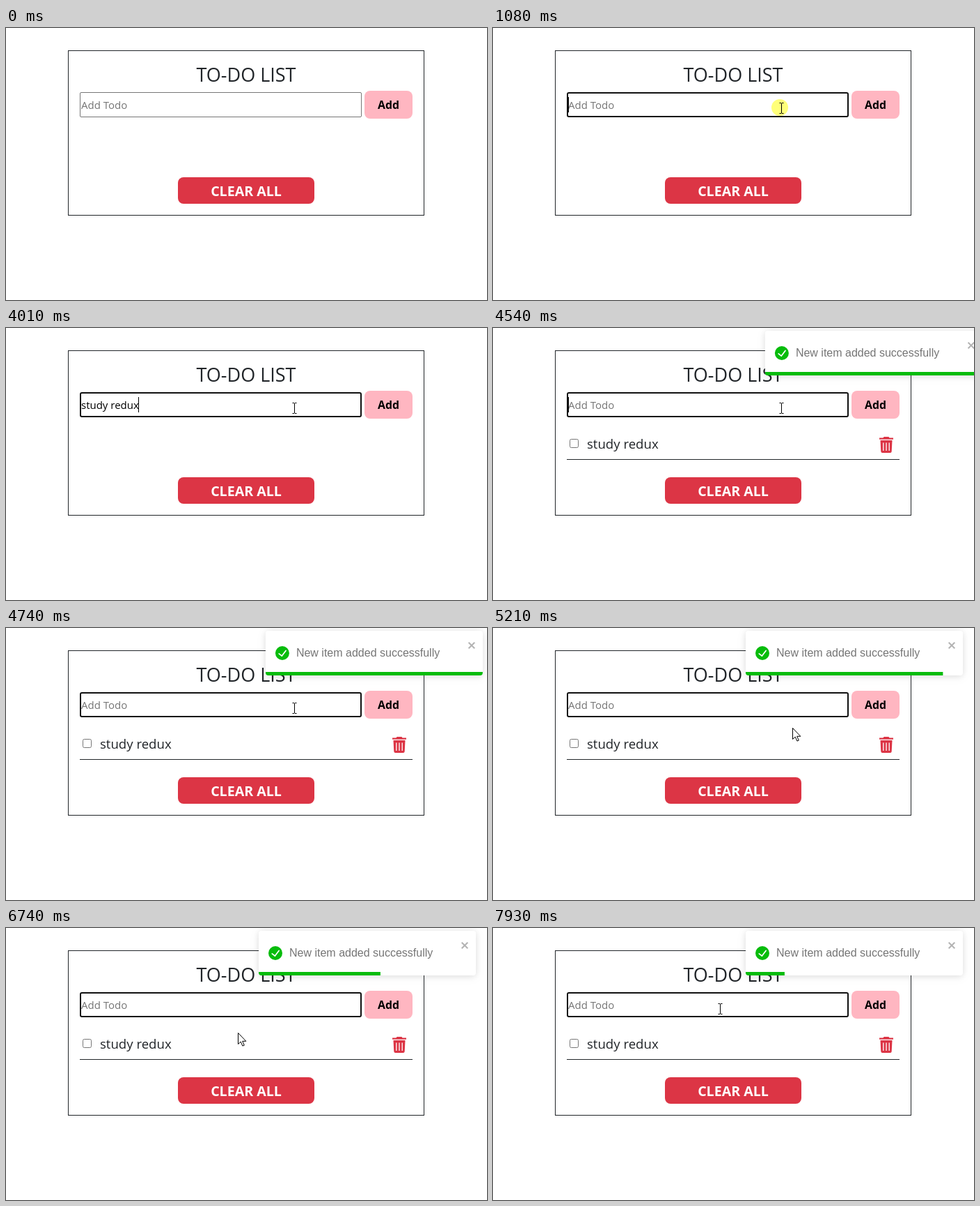
Recreate the animation shown at these times as an HTML page. Size 691 by 390 pixels, loop 8 s.

```html
<!DOCTYPE html>
<html lang="en">
<head>
<meta charset="utf-8">
<title>To-do list</title>
<style>
  html, body { margin: 0; width: 100%; height: 100%; overflow: hidden; background: #fff; }
  svg { display: block; }
  text { font-family: "Open Sans", "Noto Sans", sans-serif; fill: #212529; white-space: pre; }
  .mid { text-anchor: middle; }
  .bold { font-weight: 700; }
  .field { font-size: 15px; }
  .toast { filter: drop-shadow(0 1px 5px rgba(0, 0, 0, .1)) drop-shadow(0 2px 7px rgba(0, 0, 0, .05)); }
  .toast text { font: 16px "Liberation Sans", Arial, sans-serif; fill: #757575; }
  .line { fill: none; }
  #cursor path { stroke: #000; stroke-linejoin: round; fill: #fff; }
</style>
</head>
<body>
<svg width="691" height="390" viewBox="0 0 691 390">
  <rect x="89.500" y="32.500" width="511" height="236" fill="#fff" stroke="#212529"/>
  <text class="mid" x="345" y="77" font-size="27" font-weight="500">TO-DO LIST</text>

  <rect id="blur" x="106.500" y="92.500" width="404" height="35" rx="1.500" fill="#fff" stroke="#767676"/>
  <rect id="focus" x="107" y="93" width="403" height="34" rx="2" fill="#fff" stroke="#101010" stroke-width="2"/>
  <text id="hint" class="field" x="108" y="116" style="fill:#757575">Add Todo</text>
  <text id="typed" class="field" x="108" y="116" style="fill:#000"></text>
  <rect id="caret" y="99" width="1" height="22"/>

  <rect x="515" y="90" width="69" height="40" rx="8" fill="#ffb6c1"/>
  <text class="mid bold" x="549.500" y="116" font-size="15.800" style="fill:#000">Add</text>

  <g id="item">
    <rect x="110.500" y="159.500" width="12" height="12" rx="2" fill="#fff" stroke="#767676"/>
    <text x="135" y="173" font-size="18.600">study redux</text>
    <g fill="#dc3545">
      <path d="M555 157.500h5.500l1-1.500h7l1 1.500h5.500v2.300h-20z"/>
      <path d="M556.500 161h17l-.8 16q-.1 2-2.200 2h-11q-2.100 0-2.200-2z"/>
    </g>
    <path class="line" d="M560.800 164.500v11.500M565 164.500v11.500M569.200 164.500v11.500" stroke="#fff" stroke-width="1.300"/>
    <path d="M106 188.500h478" stroke="#212529"/>
  </g>

  <rect x="247" y="214" width="196" height="38" rx="8" fill="#dc3545"/>
  <text class="mid bold" x="345" y="241" font-size="19.600" style="fill:#fff">CLEAR ALL</text>

  <clipPath id="round"><rect width="312" height="64" rx="4"/></clipPath>
  <g id="toast">
    <g class="toast"><rect width="312" height="64" rx="4" fill="#fff"/></g>
    <g class="toast" style="filter:none">
      <circle cx="24" cy="32" r="10" fill="#07bc0c"/>
      <path class="line" d="M19.300 32.800l4.100 3.300 5.700-7.700" stroke="#fff" stroke-width="1.700" stroke-linecap="round" stroke-linejoin="round"/>
      <text x="44" y="37">New item added successfully</text>
      <path class="line" d="M291.700 16.700l8.600 8.600m0-8.600l-8.600 8.600" stroke="#b3b3b3" stroke-width="2"/>
      <g clip-path="url(#round)"><rect id="bar" y="59" height="5" fill="#07bc0c"/></g>
    </g>
  </g>

  <circle id="click" cx="412" cy="114" r="12" fill="#ffff7a"/>
  <g id="cursor">
    <path id="beam" style="fill:none" d="M-3-7.500h2.300l.7.700.7-.7H3M0-7V7M-3 7.500h2.300l.7-.7.7.7H3"/>
    <path id="arrow" d="M0 0v16l3.700-3.400 2.700 6 2.400-1-2.600-5.800h5.100z"/>
    <path id="hand" d="M-2 13V2a1.900 1.900 0 0 1 3.800 0v6.500c1-.9 3-.6 3.200.9 1-.7 2.800-.2 3 1.100 1-.4 2.500.1 2.500 1.600v4c0 2-1.500 3-1.500 5v2H0v-2c-1-2.500-3.500-5-5.500-8-1-1.800 1.500-3.200 3.500 0zM1.800 8.500v4M5 9.500v3.500M8 10.500v3.500"/>
  </g>
</svg>
<script>
const LOOP = 8000, FOCUS = 880, SUBMIT = 4290, TOAST = 4230;
const WORD = "study redux";
const keyTimes = [1610, 2000, 2150, 2420, 2620, 2750, 3140, 3340, 3540, 3680, 4010];
// Pointer path: time, x, y
const path = [
  [200, 612, 366], [440, 525, 250], [640, 445, 150], [815, 414, 115],
  [4900, 414, 115], [5210, 430, 143], [5420, 455, 118], [5635, 510, 68],
  [5780, 615, 32], [5910, 630, 26], [5980, 622, 34], [6050, 588, 70],
  [6240, 411, 199], [6400, 370, 185], [6740, 333, 150], [6950, 331, 146],
  [7250, 326, 116]
];
// Entrance bounce: fraction of duration, offset
const bounce = [[0, 3000], [.6, -25], [.75, 10], [.9, -5], [1, 0]];

const $ = id => document.getElementById(id);
const show = (id, on) => $(id).style.display = on ? "" : "none";
const inside = (x, y, l, t, r, b) => x >= l && x < r && y >= t && y < b;

function along(points, t, ease = p => p) {
  const i = points.findIndex(k => k[0] > t);
  if (i < 0) return points[points.length - 1].slice(1);
  if (i === 0) return points[0].slice(1);
  const a = points[i - 1], b = points[i];
  const p = ease((t - a[0]) / (b[0] - a[0]));
  return a.slice(1).map((v, n) => v + (b[n + 1] - v) * p);
}

function drawField(t) {
  const added = t >= SUBMIT;
  const text = added ? "" : WORD.slice(0, keyTimes.filter(k => k <= t).length);
  show("blur", t < FOCUS);
  show("focus", t >= FOCUS);
  show("hint", !text);
  show("item", added);
  $("typed").textContent = text;
  const width = text ? $("typed").getComputedTextLength() : 0;
  $("caret").setAttribute("x", Math.round(108 + width - (text ? .5 : 0)));
  show("caret", t >= FOCUS && (!added || Math.floor((t - TOAST) / 500) % 2 === 0));
}

function drawToast(t) {
  const p = (t - TOAST) / 700;
  show("toast", p > 0);
  const [dx] = along(bounce, p, q => 1 - (1 - q) ** 3);
  $("toast").setAttribute("transform", `translate(${363 + dx} 4)`);
  // The countdown stands still while the pointer rests on the toast
  const run = Math.max(0, Math.min(t, 5635) - 4925) + Math.max(0, t - 6080);
  $("bar").setAttribute("width", 312 - run * .1);
}

function drawCursor(t) {
  const [x, y] = along(path, t).map(Math.round);
  const beam = inside(x, y, 106, 92, 511, 128);
  const hand = inside(x, y, 247, 214, 443, 252) ||
    t > TOAST && inside(x, y, 363, 4, 675, 68);
  show("cursor", t >= 200);
  show("beam", beam);
  show("hand", hand);
  show("arrow", !beam && !hand);
  show("click", t >= FOCUS && t < 1280);
  $("cursor").setAttribute("transform", `translate(${x + .5} ${y + (beam ? 0 : .5)})`);
}

function frame() {
  const t = performance.now() % LOOP;
  drawField(t);
  drawToast(t);
  drawCursor(t);
  requestAnimationFrame(frame);
}
frame();
</script>
</body>
</html>
```
